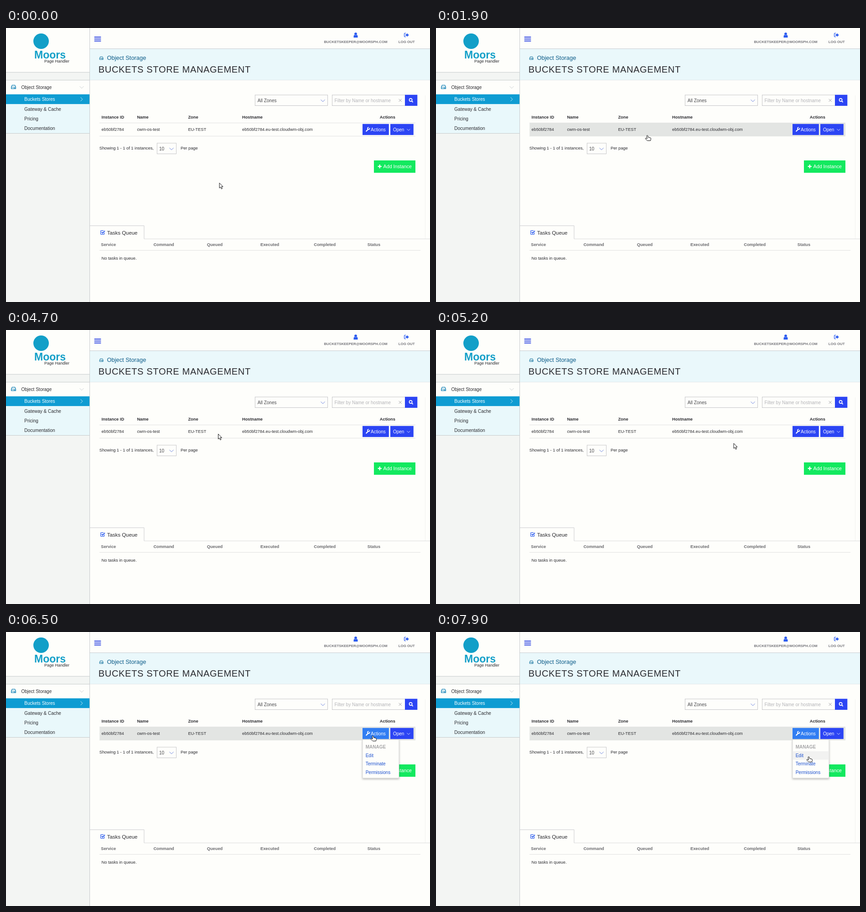
An HTML page for the animation above (8000 ms loop, 930 by 602 pixels).

```html
<!DOCTYPE html>
<html lang="en">
<head>
<meta charset="utf-8">
<title>Buckets store management</title>
<style>
html, body { margin: 0; width: 100%; height: 100%; overflow: hidden; background: #fefefb; }
svg { display: block; width: 930px; height: 602px; }
text { font: 9.29px "Liberation Sans", Arial, sans-serif; fill: #2b2b30; white-space: pre; }
.b { font-weight: bold; }
.m { font-size: 10px; }
.s { font-size: 7.86px; font-weight: bold; fill: #74747a; text-anchor: middle; }
.g { font-weight: bold; fill: #6a6a6e; }
.w { fill: #fff; }
.link { font-size: 10px; fill: #1c50cf; }
.line { fill: none; stroke-width: .8; }
.box { fill: #fefefb; stroke: #b8b8bc; stroke-width: .8; }
.hide { visibility: hidden; }
</style>
</head>
<body>
<svg viewBox="0 0 930 602">
  <defs>
    <filter id="soft" x="-30%" y="-30%" width="160%" height="170%">
      <feDropShadow dx="0" dy="2" stdDeviation="2.2" flood-opacity=".28"/>
    </filter>
    <g id="disk" fill="none" stroke-width="1.2" stroke-linejoin="round">
      <path d="M.6 5 2.4.6H8.6L10.4 5V8.4H.6ZM.6 5H10.4M6.4 6.8H8.8"/>
    </g>
    <path id="down" d="M0 0 4.5 4.5 9 0" fill="none" stroke-width=".9"/>
  </defs>

  <!-- sidebar -->
  <rect width="184" height="602" fill="#f3f5f3"/>
  <rect width="184" height="97" fill="#fefefb"/>
  <rect y="115" width="184" height="31" fill="#fefefb"/>
  <rect y="167" width="184" height="64" fill="#e9f8fb"/>
  <path class="line" stroke="#bbc0c3" d="M0 97.3H183M0 114.6H183M0 231.5H183"/>
  <rect y="145.7" width="183.3" height="21.4" fill="#0e9cd2"/>
  <path class="line" stroke="#b8bbc0" d="M183.6 0V602"/>
  <circle cx="77" cy="29" r="17" fill="#129fc8"/>
  <text class="b" x="62" y="66.5" style="font-size:23px;fill:#129fc8">Moors</text>
  <text x="84" y="76" style="font-size:9px">Page Handler</text>
  <use href="#disk" x="11" y="125" stroke="#0f7fb5"/>
  <text class="m" x="33.5" y="134">Object Storage</text>
  <use href="#down" x="161.5" y="128" stroke="#c6cacc"/>
  <text class="m w" x="40.3" y="160">Buckets Stores</text>
  <path class="line" stroke="#fff" d="M163.7 152.3 167.8 156.5 163.7 160.7"/>
  <text class="m" x="40.3" y="181.5">Gateway &amp; Cache</text>
  <text class="m" x="40.3" y="202.9">Pricing</text>
  <text class="m" x="40.3" y="224.3">Documentation</text>

  <!-- top bar -->
  <path stroke="#2d43e2" stroke-width="2" d="M193.7 20H208.3M193.7 24.3H208.3M193.7 28.6H208.3"/>
  <g fill="#2c5cf0">
    <circle cx="767" cy="12.8" r="2.9"/>
    <path d="M762.5 21V18.5Q762.6 15.3 764.6 15.2Q767 17 769.4 15.2Q771.4 15.3 771.5 18.5V21Z"/>
    <path d="M876.3 13.8H879.2V11.2L883.8 15.4 879.2 19.6V17H876.3Z"/>
    <path d="M877 11.4H875Q873.6 11.4 873.6 13V17.8Q873.6 19.4 875 19.4H877" fill="none" stroke="#2c5cf0" stroke-width="1.3"/>
  </g>
  <text class="s" x="767" y="33.4">BUCKETSKEEPER@MOORSPH.COM</text>
  <text class="s" x="878.7" y="33.4">LOG OUT</text>
  <rect x="184" y="46" width="746" height="68" fill="#eaf8fb"/>
  <path class="line" stroke="#b8bec4" d="M184 45.6H930"/>
  <path class="line" stroke="#dde5e7" d="M184 114.4H930"/>
  <use href="#disk" transform="translate(204.8 62.6) scale(.8)" stroke="#0f6f9c"/>
  <text x="221.5" y="70" style="font-size:12.86px;fill:#0b5b88">Object Storage</text>
  <text x="202.8" y="98" style="font-size:20px;letter-spacing:.69px">BUCKETS STORE MANAGEMENT</text>

  <!-- filters -->
  <path class="line" stroke="#efefed" d="M919.5 148V463"/>
  <rect class="box" x="546.3" y="147.1" width="159.2" height="23.5"/>
  <text class="m" x="551.8" y="162.5" style="fill:#48484c">All Zones</text>
  <use href="#down" x="690.5" y="157.4" stroke="#5773dc"/>
  <rect class="box" x="715.4" y="147.1" width="160" height="23.5"/>
  <text class="m" x="720.6" y="162.5" style="fill:#b4b4b8">Filter by Name or hostname</text>
  <path class="line" stroke="#8a8a8e" d="M861.6 155.8 867.8 162M867.8 155.8 861.6 162"/>
  <rect x="875" y="146.7" width="27.3" height="24.3" fill="#2c45f4"/>
  <g fill="none" stroke="#fff">
    <circle cx="887.6" cy="158" r="3.1" stroke-width="1.6"/>
    <path d="M889.9 160.4 892.6 163.1" stroke-width="2"/>
  </g>

  <!-- instances -->
  <text class="b" x="209.6" y="198.8">Instance ID</text>
  <text class="b" x="287.4" y="198.8">Name</text>
  <text class="b" x="399.4" y="198.8">Zone</text>
  <text class="b" x="518" y="198.8">Hostname</text>
  <text class="b" x="819.8" y="198.8">Actions</text>
  <path class="line" stroke="#dadada" d="M205 208.6H898M205 237.6H898"/>
  <rect id="row" class="hide" x="205.3" y="209" width="692.7" height="29" fill="#e3e5e3"/>
  <text x="209.6" y="226.4">eb50bf2784</text>
  <text x="287.4" y="226.4">cwm-os-test</text>
  <text x="399.4" y="226.4">EU-TEST</text>
  <text x="518" y="226.4">eb50bf2784.eu-test.cloudwm-obj.com</text>
  <rect id="act" x="782" y="210.8" width="57.8" height="24.3" fill="#2c45f4"/>
  <path d="M790.3 226.6 794.6 222.3" stroke="#fff" stroke-width="2.2" stroke-linecap="round"/>
  <path d="M797.4 219.6A2.3 2.3 0 1 1 795.6 218.3" fill="none" stroke="#fff" stroke-width="1.8"/>
  <text class="m w" x="800" y="226.6">Actions</text>
  <rect x="843" y="210.8" width="50.8" height="24.3" fill="#2c45f4"/>
  <text class="m w" x="848.9" y="226.6">Open</text>
  <path class="line" stroke="#fff" d="M879.4 221.8 882.9 225.3 886.4 221.8"/>
  <text x="204.7" y="267.2">Showing 1 - 1 of 1 instances,</text>
  <rect class="box" x="331.3" y="253" width="42.3" height="23.5"/>
  <text class="m" x="336" y="268.6" style="fill:#48484c">10</text>
  <use href="#down" x="358.5" y="263.3" stroke="#5773dc"/>
  <text x="383" y="267.2">Per page</text>
  <rect x="807" y="290.9" width="91" height="27.2" fill="#13e95f"/>
  <path d="M815.6 304.2H823.8M819.7 300.1V308.3" stroke="#fff" stroke-width="2.2"/>
  <text class="w" x="827.6" y="308.2" style="font-size:10.7px">Add Instance</text>

  <!-- tasks -->
  <path class="line" stroke="#bfc1c5" d="M184 434.4H302.9V463.4"/>
  <path class="line" stroke="#d2d4d6" d="M303 463.4H930"/>
  <path d="M215.6 449.5V452.2Q215.6 453.4 214.4 453.4H208.8Q207.6 453.4 207.6 452.2V446.4Q207.6 445.2 208.8 445.2H214" fill="none" stroke="#2c5cf0" stroke-width="1.2"/>
  <path d="M209.6 448.4 212 450.7 216.8 445.6" fill="none" stroke="#2c5cf0" stroke-width="1.9"/>
  <text x="221.8" y="453.6" style="font-size:11.43px">Tasks Queue</text>
  <text class="g" x="208.2" y="479.3">Service</text>
  <text class="g" x="323.4" y="479.3">Command</text>
  <text class="g" x="440.7" y="479.3">Queued</text>
  <text class="g" x="558" y="479.3">Executed</text>
  <text class="g" x="675.2" y="479.3">Completed</text>
  <text class="g" x="792.7" y="479.3">Status</text>
  <path class="line" stroke="#d8d8d8" d="M205 488.5H909"/>
  <text x="209.6" y="509">No tasks in queue.</text>

  <!-- overlays -->
  <g id="tip" class="hide">
    <rect x="473" y="237" width="49" height="17" fill="#2c2c2e" filter="url(#soft)"/>
    <text x="477.6" y="249" style="font:10.2px 'Noto Sans',sans-serif;fill:#fff">EU-TEST</text>
  </g>
  <g id="menu" class="hide">
    <rect x="782" y="236.5" width="80" height="84.5" fill="#fefefb" stroke="#c6c6c6" stroke-width=".7" filter="url(#soft)"/>
    <rect id="hot" x="782.5" width="79" height="18.5" fill="#f2f2f1"/>
    <text class="m b" x="788.7" y="256.3" style="fill:#a6a6a8">MANAGE</text>
    <text class="link" x="788.7" y="274.8">Edit</text>
    <text class="link" x="788.7" y="293.3">Terminate</text>
    <text class="link" x="788.7" y="311.8">Permissions</text>
  </g>
  <g id="cursor" stroke="#111" stroke-width="1" stroke-linejoin="round" fill="#fff">
    <path id="arrow" d="M.5.5V11.7L3 9.4 4.9 13.6 6.9 12.7 5 8.6H8.4Z"/>
    <path id="hand" d="M-1.9.8Q-.6-1.2.6.6L1.4 4 6 5.1Q7.8 5.7 7.4 7.8L6.4 11.6H-.4L-4.8 7.4Q-5 5.6-3.2 5.9L-.8 7.1Z"/>
  </g>
</svg>
<script>
const LOOP = 8000, STEP = 100;
// time, x, y of the pointer
const path = [
  [0, 467.6, 340], [700, 467.6, 340], [1100, 472, 312], [1500, 464, 274], [1600, 464, 262],
  [1900, 464, 236], [2300, 465, 225], [4600, 465, 225], [4700, 465, 228],
  [4800, 465, 228], [5100, 560, 250], [5300, 745, 247], [5500, 805, 225],
  [6400, 805, 225], [6500, 805, 228], [6600, 805, 236], [6700, 805, 236],
  [7100, 810, 262], [7600, 869, 308], [7900, 818, 274], [8000, 818, 274]
];
const $ = id => document.getElementById(id);
const show = (id, on) => { $(id).style.visibility = on ? "visible" : "hidden"; };

function pointer(t) {
  const i = path.findIndex(p => p[0] > t);
  const [t0, x0, y0] = path[i - 1], [t1, x1, y1] = path[i];
  const k = (t - t0) / (t1 - t0);
  return [x0 + (x1 - x0) * k, y0 + (y1 - y0) * k];
}

function draw(t) {
  const [x, y] = pointer(t);
  const open = t >= 6500;
  const row = open || (y < 238 && !(t >= 4700 && t < 5100));
  const item = Math.floor((y - 262) / 18.5);
  $("cursor").setAttribute("transform", `translate(${x} ${y})`);
  show("hand", row);
  show("arrow", !row);
  show("row", row);
  show("tip", t >= 3000 && t < 4700);
  show("menu", open);
  show("hot", open && item >= 0 && item < 3 && x < 862);
  $("hot").setAttribute("y", 262 + 18.5 * item);
  $("act").setAttribute("fill", open || (row && x > 782) ? "#317df2" : "#2c45f4");
}

const start = performance.now();
function tick() {
  const t = (performance.now() - start) % LOOP;
  draw(Math.floor(t / STEP) * STEP);
  requestAnimationFrame(tick);
}
tick();
</script>
</body>
</html>
```
